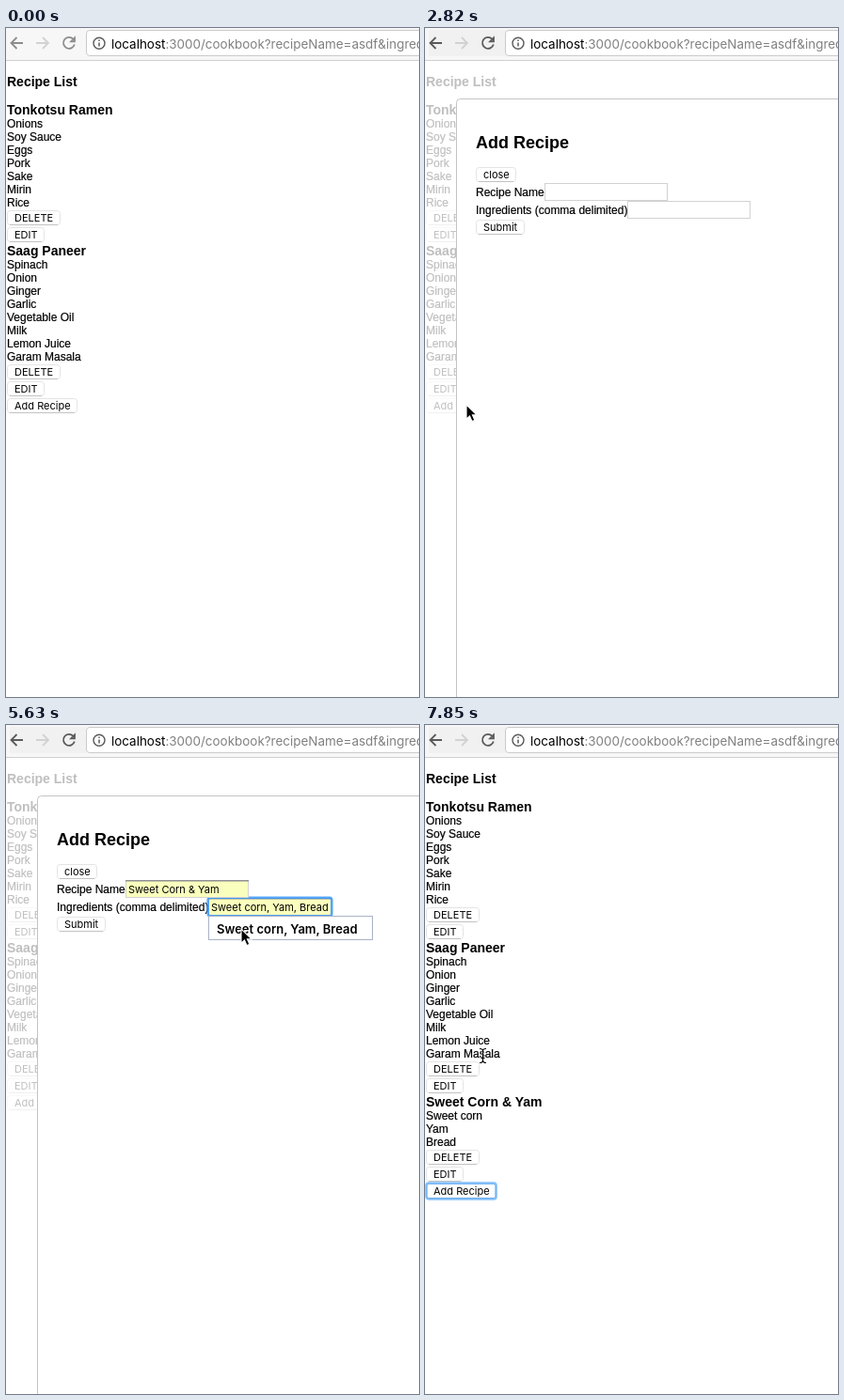
An HTML page for the animation above (7.99 s loop, 439 by 712 pixels).

```html
<!DOCTYPE html>
<html lang="en">
<head>
<meta charset="utf-8">
<title>Recipe list</title>
<style>
  html, body { margin: 0; width: 100%; height: 100%; overflow: hidden; background: #fff; }
  svg { display: block; width: 439px; height: 712px; }
  text { white-space: pre; }
  .item { font: 12px "Liberation Sans", sans-serif; stroke: #000; stroke-width: .2; }
  .head { font: bold 14px "Liberation Sans", sans-serif; }
  .title { font: bold 18px "Liberation Sans", sans-serif; }
  .ui { font: 11px Inter, sans-serif; }
  .option { font: 600 13px Inter, sans-serif; }
  .url { font: 13.45px Inter, sans-serif; }
  .icon { fill: none; stroke: #8c8c8c; stroke-width: 1.8; }
  .active .icon { stroke: #5a5a5a; }
  .icon.off, .active .icon.off { stroke: #d2d2d2; }
  .ring { fill: none; stroke: #3b99fc; stroke-width: 2.6; opacity: .62; }
</style>
</head>
<body>
<svg id="stage" viewBox="0 0 439 712" xmlns="http://www.w3.org/2000/svg"></svg>
<script>
const LOOP = 7990;
const DISH = 'Sweet Corn & Yam';
const PARTS = ['Sweet corn', 'Yam', 'Bread'];
const LIST = PARTS.join(', ');

const esc = s => s.replace(/&/g, '&amp;');
const text = (cls, x, y, s) => `<text class="${cls}" x="${x}" y="${y}">${esc(s)}</text>`;
const box = (x, y, w, h, attrs) =>
  `<rect x="${x}" y="${y}" width="${w}" height="${h}" ${attrs}/>`;
const ring = (id, x, y, w, h) => box(x, y, w, h, `id="${id}" class="ring" rx="2.5"`);

// y is the baseline of the label
const button = (x, y, w, label) =>
  box(x + .5, y - 11.5, w - 1, 15, 'rx="3" fill="#fff" stroke="#e4e4e4"') +
  `<path d="M${x + 3} ${y + 3.5}h${w - 6}" stroke="#c2c2c2"/>` +
  text('ui', x + 8, y, label);

function recipe(y, name, items) {
  const end = y + 14 * items.length;
  return text('head', 1, y, name) +
    items.map((s, i) => text('item', 1, y + 14 * (i + 1), s)).join('') +
    button(1, end + 16, 57, 'DELETE') + button(1, end + 34, 40, 'EDIT');
}

const field = (id, x, y) => `<g id="${id}">
  ${box(x + .5, y + .5, 130, 18, 'class="back" fill="#fff" stroke="#d2d2d2"')}
  <path class="edge" d="M${x} ${y + .7}h131" stroke="#8f8f94" stroke-width="1.4"/>
  <svg x="${x + 2}" y="${y}" width="127" height="19"><text class="ui" x="1" y="14"></text></svg>
  <path class="caret" d="M0 ${y + 3}v13" stroke="#000"/>
  ${ring(id + 'Ring', x - .3, y - .3, 131.6, 19.6)}</g>`;

const menu = (id, x, y, w, label) => `<g id="${id}">
  ${box(x + .5, y + .5, w - 1, 25, 'fill="#fff" stroke="#a9b2c4"')}
  ${text('option', x + 9, y + 18.5, label)}</g>`;

const toolbar = `
  ${box(0, 0, 439, 35, 'fill="#f7f7f7"')}
  ${box(4, 2, 82, 28, 'id="tint" fill="#f1f1f1"')}
  <path d="M0 34.5h439" stroke="#d0d0d0"/>
  ${box(85.5, 2.5, 370, 27, 'rx="3.5" fill="#fff" stroke="#cbcbcb"')}
  <path class="icon" d="M18 16H6M11.5 10L5.5 16L11.5 22"/>
  <path class="icon off" d="M32 16h12M39 10l6 6l-6 6"/>
  <path class="icon" d="M71.4 11.8A6 6 0 1 0 72.8 17.5M73 10.5v3.8h-3.8z"/>
  <circle cx="99" cy="16.3" r="6" fill="none" stroke="#5a5a5a" stroke-width="1.4"/>
  <path d="M99 15.5v4M99 12.5v1.6" stroke="#5a5a5a" stroke-width="1.5"/>
  <text class="url" x="112" y="21.5">localhost<tspan fill="#808080">:3000/cookbook?recipeName=asdf&amp;ingredients</tspan></text>`;

const page = `
  ${text('head', 1, 62, 'Recipe List')}
  ${recipe(92, 'Tonkotsu Ramen', ['Onions', 'Soy Sauce', 'Eggs', 'Pork', 'Sake', 'Mirin', 'Rice'])}
  ${recipe(242, 'Saag Paneer', ['Spinach', 'Onion', 'Ginger', 'Garlic', 'Vegetable Oil', 'Milk', 'Lemon Juice', 'Garam Masala'])}
  <g id="added">${recipe(406, DISH, PARTS)}</g>
  <g id="add">${button(1, 406, 75, 'Add Recipe')}${ring('addRing', 1.5, 393.6, 74, 16.8)}</g>`;

const modal = `<g id="modal">
  ${box(0, 36, 439, 676, 'fill="#fff" opacity=".75"')}
  ${box(33.5, 75.5, 500, 700, 'rx="4" fill="#fff" stroke="#c4c4c4"')}
  ${text('title', 54, 128, 'Add Recipe')}
  ${button(54, 160, 43, 'close')}
  ${text('item', 54, 179, 'Recipe Name')}
  ${text('item', 54, 198, 'Ingredients (comma delimited)')}
  ${button(54, 216, 52, 'Submit')}
  ${ring('submitRing', 54.5, 203.6, 51, 16.8)}
  ${field('parts', 215, 184)}${field('name', 127, 165)}
  ${menu('nameMenu', 126, 184, 138, DISH)}${menu('partsMenu', 215, 203, 175, LIST)}</g>`;

const beam = 'M-3.5 -7.5Q0 -7.5 0 -5V5Q0 7.5 -3.5 7.5M3.5 -7.5Q0 -7.5 0 -5V5Q0 7.5 3.5 7.5M-2 2.5H2';
const cursors = `
  <path id="arrow" d="M0 0V15.2L3.5 12L6 17.6L8.8 16.4L6.4 10.9H11Z" fill="#000" stroke="#fff" stroke-width="1.1"/>
  <g id="beam" fill="none">
    <path d="${beam}" stroke="#fff" stroke-width="2.4" opacity=".7"/>
    <path d="${beam}" stroke="#000" stroke-width="1.2"/>
  </g>`;

const stage = document.getElementById('stage');
stage.innerHTML = page + modal + toolbar + cursors;
const $ = id => document.getElementById(id);
const show = (el, on) => { el.style.display = on ? '' : 'none'; };

// [time, pointer x, pointer y, other changes]
const steps = [
  [0, -50, -50, { pointer: 'arrow', active: false, modal: false, added: false, focus: '',
                  menu: '', name: '', parts: '', nameFilled: false, partsFilled: false }],
  [1490, 185, 330],
  [1640, 150, 388],
  [1790, 100, 412],
  [1930, 62, 412],
  [2080, 45, 410, { active: true }],
  [2230, 41, 408],
  [2530, 41, 408, { modal: true }],
  [2820, 44, 401],
  [2970, 70, 350],
  [3120, 120, 270],
  [3270, 165, 207],
  [3410, 186.5, 180, { pointer: 'beam' }],
  [3560, 188.5, 177, { focus: 'name' }],
  [3860, 188, 186, { pointer: 'arrow', menu: 'name', name: DISH.slice(0, 1) }],
  [4160, 188, 186, { name: DISH.slice(0, 2) }],
  [4310, 190, 194],
  [4450, 191, 199, { name: DISH, nameFilled: true }],
  [4600, 195, 199, { menu: '' }],
  [4750, 215.5, 194, { pointer: 'beam' }],
  [4900, 245.5, 190],
  [5040, 257.5, 187, { focus: 'parts' }],
  [5330, 257.5, 187, { menu: 'parts', parts: LIST.slice(0, 1) }],
  [5480, 255, 207, { pointer: 'arrow' }],
  [5630, 250, 217, { parts: LIST, partsFilled: true }],
  [5930, 235, 218, { menu: '' }],
  [6080, 170, 218],
  [6220, 113.5, 215.5],
  [6370, 88, 212],
  [6520, 82, 211, { focus: 'submit' }],
  [6660, 82, 211, { added: true }],
  [6960, 80, 190],
  [7110, 76, 164],
  [7260, 75, 159, { modal: false, focus: 'add' }],
  [7410, 75, 157],
  [7700, 65, 290],
  [7850, 61.5, 352, { pointer: 'beam' }]
];

function drawField(id, s) {
  const el = $(id), label = el.querySelector('text'), caret = el.querySelector('.caret');
  const filled = s[id + 'Filled'], focused = s.focus === id;
  label.textContent = s[id];
  el.querySelector('.back').setAttribute('fill', filled ? '#faffbd' : '#fff');
  show(el.querySelector('.edge'), filled);
  show($(id + 'Ring'), focused);
  $(id + 'Ring').style.opacity = filled ? .85 : '';
  show(caret, focused && !filled);
  const left = id === 'name' ? 130 : 218;
  const width = s[id] ? label.getComputedTextLength() : 0;
  caret.setAttribute('transform', `translate(${Math.round(left + width) + .5} 0)`);
  show($(id + 'Menu'), s.menu === id);
}

function draw(count) {
  const s = Object.assign({}, ...steps.slice(0, count).map(step => step[3]));
  const [, x, y] = steps[count - 1];
  stage.classList.toggle('active', s.active);
  show($('tint'), s.active);
  show($('modal'), s.modal);
  show($('added'), s.added);
  $('add').setAttribute('transform', `translate(0 ${s.added ? 94 : 0})`);
  show($('addRing'), s.focus === 'add');
  show($('submitRing'), s.focus === 'submit');
  drawField('name', s);
  drawField('parts', s);
  for (const id of ['arrow', 'beam']) {
    show($(id), s.pointer === id);
    $(id).setAttribute('transform', `translate(${x} ${y})`);
  }
}

let shown = 0;
function tick() {
  const t = performance.now() % LOOP;
  const count = steps.filter(step => step[0] <= t).length;
  if (count !== shown) draw(shown = count);
  requestAnimationFrame(tick);
}
tick();
</script>
</body>
</html>
```
